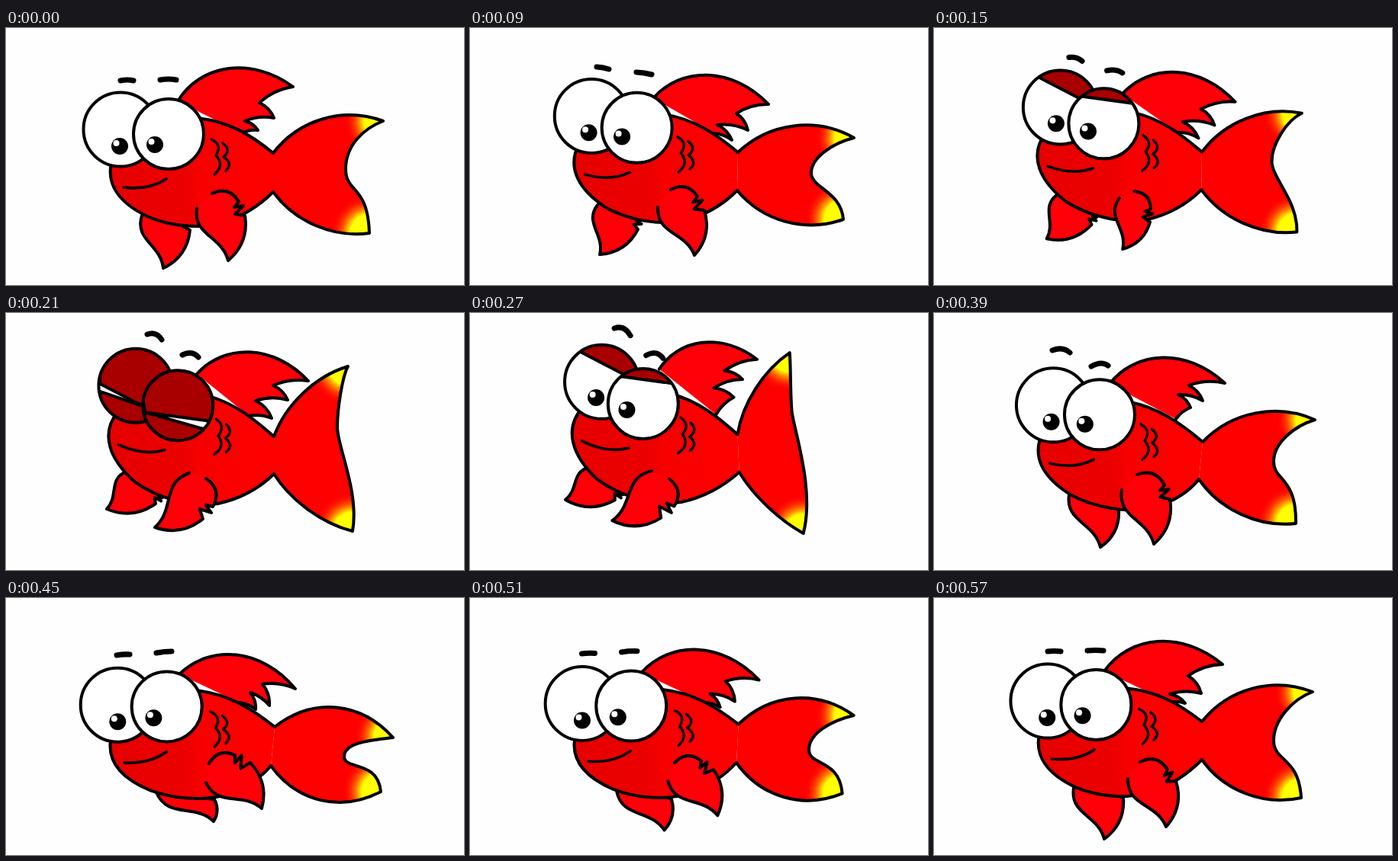
Animation, 600 px wide and 337 px high, one loop 600 ms. Source, as an HTML page:

```html
<!DOCTYPE html>
<html lang="en">
<head>
<meta charset="utf-8">
<title>Swimming fish</title>
<style>
  html, body { margin: 0; width: 100%; height: 100%; overflow: hidden; background: #fefefe; }
  svg { display: block; width: 100vw; height: 100vh; }
</style>
</head>
<body>
<svg id="stage" viewBox="0 0 600 337">
  <defs>
    <linearGradient id="skin" gradientUnits="userSpaceOnUse" x1="135" y1="0" x2="350" y2="0">
      <stop offset="0" stop-color="#e60000"/><stop offset=".48" stop-color="#ec0000"/>
      <stop offset=".56" stop-color="#f80000"/><stop offset="1" stop-color="#f00"/>
    </linearGradient>
  </defs>
</svg>
<script>
const LOOP = 600, STEP = 30;
const TIMES = [0, 90, 210, 330, 390, 450, 570];
const COUNT = TIMES.length;
const FIN_RED = '#ff0009';

// One row per key time; each row lists point coordinates.
const BEND = [[0], [.39], [.84], [1], [.27], [-.16], [-.045]];

// arc start, first notch, last notch, tip, base end
const NEAR_FIN = [
  [270,217, 305,228, 313,246, 291,305, 250,236],
  [263,212, 298,221, 307,239, 294,298, 246,235],
  [262,217, 271,254, 258,270, 195,281, 240,210],
  [261,218, 266,252, 247,265, 183,267, 237,206],
  [266,212, 302,226, 309,244, 288,303, 246,232],
  [266,217, 300,206, 320,216, 335,276, 262,242],
  [270,215, 306,225, 317,240, 304,300, 254,237]
];
const FAR_FIN = [
  [215,240, 240,248, 241,265, 206,315, 178,246],
  [200,225, 224,252, 220,264, 170,297, 167,232],
  [200,225, 205,242, 196,250, 132,257, 157,208],
  [190,220, 198,236, 187,243, 122,239, 155,200],
  [215,235, 240,243, 242,258, 218,307, 177,238],
  [240,245, 268,254, 273,264, 272,293, 197,255],
  [220,240, 245,248, 248,262, 223,316, 183,249]
];

// base, then alternating tips and notches
const DORSAL = [
  [225,96, 376,77, 332,98, 351,118, 313,122, 330,134, 309,138],
  [240,92, 391,100, 349,112, 364,134, 324,127, 343,147, 320,138],
  [250,80, 396,89, 350,95, 369,114, 327,115, 348,138, 318,135],
  [243,70, 356,37, 317,62, 345,67, 312,86, 341,87, 327,132],
  [230,93, 381,92, 334,95, 352,115, 320,107, 336,124, 317,139],
  [227,100, 379,119, 336,113, 345,141, 320,124, 327,146, 305,137],
  [223,96, 378,87, 333,102, 350,125, 309,126, 329,138, 309,137]
];

// upper joint, upper tip, notch, notch tangent, lower handle, lower tip, lower joint, bulges
const TAIL = [
  [350,164, 494,122, 445,185, 0,32, 474,205, 476,269, 350,215, .22,.18],
  [351,163, 503,144, 447,190, 0,20, 486,214, 489,251, 350,213, .22,.21],
  [351,162, 448,70, 434,150, 0,25, 463,235, 454,286, 351,211, .15,.12],
  [350,157, 402,44, 413,115, 4,22, 446,222, 427,290, 354,207, .12,.06],
  [352,169, 499,140, 445,195, 0,25, 475,215, 474,276, 347,218, .21,.18],
  [352,169, 507,183, 443,208, 0,18, 487,212, 491,254, 347,220, .28,.26],
  [351,162, 496,123, 445,187, 0,28, 478,208, 481,262, 351,212, .22,.2]
];

// both brows: ends, then arch height
const BROWS = [
  [150,69, 167,69, 202,68, 223,68, 2],
  [166,51, 182,54, 218,58, 238,61, 1],
  [185,28, 204,35, 231,55, 252,58, 8],
  [191,16, 213,27, 230,57, 253,62, 10],
  [155,49, 178,52, 206,70, 228,69, 7],
  [145,75, 162,74, 197,72, 217,70, 1],
  [149,70, 166,70, 201,69, 222,69, 1]
];

// Smooth looping interpolation that never overshoots its keys.
function pose(rows, t) {
  let i = COUNT - 1;
  while (TIMES[i] > t) i--;
  const time = k => TIMES[(k + COUNT) % COUNT] + LOOP * Math.floor(k / COUNT);
  const span = time(i + 1) - time(i), u = (t - time(i)) / span;
  return rows[0].map((_, c) => {
    const at = k => rows[(k + COUNT) % COUNT][c];
    const slope = k => (at(k + 1) - at(k)) / (time(k + 1) - time(k));
    const tangent = k => {
      const a = slope(k - 1), b = slope(k);
      return a * b > 0 ? 2 * a * b / (a + b) : 0;
    };
    const a = at(i), b = at(i + 1);
    return a + (b - a) * u * u * (3 - 2 * u)
      + span * u * (1 - u) * ((1 - u) * tangent(i) - u * tangent(i + 1));
  });
}

const pairs = list => Array.from({ length: list.length >> 1 }, (_, i) => [list[2 * i], list[2 * i + 1]]);
const str = p => p.map(v => v.toFixed(2)).join(' ');
const move = p => 'M' + str(p);
const line = p => 'L' + str(p);
const quad = (c, p) => 'Q' + str(c) + ' ' + str(p);
const cubic = (a, b, p) => 'C' + [a, b, p].map(str).join(' ');

// Point at u along a-b and v to its side, both in chord lengths.
function beside([ax, ay], [bx, by], u, v) {
  const dx = bx - ax, dy = by - ay;
  return [ax + u * dx + v * dy, ay + u * dy - v * dx];
}
const bow = (a, b, k) => quad(beside(a, b, .5, k), b);
const sweep = (a, b, u1, v1, u2, v2) => cubic(beside(a, b, u1, v1), beside(a, b, u2, v2), b);

const stage = document.getElementById('stage');
function add(tag, attrs, parent = stage) {
  const node = document.createElementNS('http://www.w3.org/2000/svg', tag);
  set(node, attrs);
  return parent.appendChild(node);
}
function set(node, attrs) {
  for (const k in attrs) node.setAttribute(k, attrs[k]);
}
const outlined = (fill, width = 4, parent = stage) => add('path', {
  fill, stroke: '#000', 'stroke-width': width, 'stroke-linejoin': 'round', 'stroke-linecap': 'round'
}, parent);

function tipGlow(id, r) {
  const glow = add('radialGradient', { id, gradientUnits: 'userSpaceOnUse', r }, stage.querySelector('defs'));
  add('stop', { offset: .5, 'stop-color': '#ff0' }, glow);
  add('stop', { offset: 1, 'stop-color': '#f00', 'stop-opacity': 0 }, glow);
  return glow;
}

function makeEye(id, rest, r, pupil, upperLid, lowerLid) {
  const clip = add('clipPath', { id }, stage.querySelector('defs'));
  add('circle', { r }, clip);
  const group = add('g', {});
  add('circle', { r, fill: '#fff' }, group);
  const ball = add('g', {}, group);
  add('circle', { r: 11, fill: '#000' }, ball);
  add('circle', { cx: -4.5, cy: -4, r: 4, fill: '#fff' }, ball);
  const lids = add('g', { 'clip-path': `url(#${id})` }, group);
  const lower = outlined('#a80000', 4, lids), upper = outlined('#a80000', 4, lids);
  add('circle', { r, fill: 'none', stroke: '#000', 'stroke-width': 4 }, group);

  const lidPath = (edge, shift, far) =>
    move([edge[0], edge[1] + shift]) + line([edge[2], edge[3] + shift]) + line([70, far]) + line([-70, far]) + 'Z';

  return (bend, amount, closed) => {
    const turn = amount * 18 * Math.PI / 180, cos = Math.cos(turn), sin = Math.sin(turn);
    set(group, { transform: `translate(${str(bend(rest))})` });
    set(ball, { transform: `translate(${str([pupil[0] * cos - pupil[1] * sin, pupil[0] * sin + pupil[1] * cos])})` });
    set(lids, { display: closed > 0 ? 'inline' : 'none' });
    set(upper, { d: lidPath(upperLid, -70 * (1 - closed), -150) });
    set(lower, { d: lidPath(lowerLid, 60 * (1 - closed), 150) });
  };
}

const farFin = outlined(FIN_RED);
const dorsal = outlined(FIN_RED);
const tailFill = add('path', { fill: '#f00' });
const glows = [tipGlow('glowTop', 50), tipGlow('glowLow', 50)];
const glowFills = glows.map(g => add('path', { fill: `url(#${g.id})` }));
const tail = outlined('none');
const body = outlined('url(#skin)');
const nearFin = outlined(FIN_RED);
const mouth = outlined('none', 3.6);
const scales = outlined('none', 3.4);
const eyes = [
  makeEye('leftEye', [150, 133], 48.5, [-1, 22], [-46, -2, 50, 48], [-46, 8, 50, 41]),
  makeEye('rightEye', [213, 139], 46, [-18, 14], [-43, 9, 45, 21], [-43, 9, 45, 34])
];
const brows = outlined('none', 7);

function finPath(list) {
  const [start, p, q, tip, end] = pairs(list);
  return move(start) + bow(start, p, .45)
    + [[.2, -.42], [.36, .17], [.64, -.56]].map(([u, v]) => line(beside(p, q, u, v))).join('')
    + line(q) + bow(q, tip, .28) + sweep(tip, end, .4, -.12, .65, .29);
}

function dorsalPath(list) {
  const pts = pairs(list);
  let d = move(pts[0]) + sweep(pts[0], pts[1], .23, .29, .67, .31);
  for (let i = 2; i < pts.length; i++) d += bow(pts[i - 1], pts[i], i % 2 ? .2 : -.15);
  return d;
}

function tailPath([j1, t1, n, tan, handle, t2, j2, [top, low]]) {
  return move(j1) + sweep(j1, t1, .3, top, .7, top)
    + cubic([t1[0] + .5 * (n[0] - t1[0]), t1[1] + .15 * (n[1] - t1[1])], [n[0] - tan[0], n[1] - tan[1]], n)
    + cubic([n[0] + tan[0], n[1] + tan[1]], handle, t2)
    + sweep(t2, j2, .3, low, .7, low);
}

function draw(t) {
  const [amount] = pose(BEND, t);
  const tailPts = pairs(pose(TAIL, t));
  const [j1, t1, , , , t2, j2] = tailPts;
  const lift = j1[1] - 164;

  // The body curls up toward the head, more the farther from the tail joint.
  const bend = ([x, y]) => {
    const d = Math.max(0, 350 - x), k = 45 * amount / 40000;
    return [x - 1.85 * k * d * (y - 190), y - k * d * d + lift * Math.max(0, 1 - d / 130)];
  };
  const bq = (a, b) => quad(bend(a), bend(b));
  const bc = (a, b, c) => cubic(bend(a), bend(b), bend(c));

  set(farFin, { d: finPath(pose(FAR_FIN, t)) });
  set(nearFin, { d: finPath(pose(NEAR_FIN, t)) });
  set(dorsal, { d: dorsalPath(pose(DORSAL, t)) });

  const d = tailPath(tailPts);
  [tailFill, tail, ...glowFills].forEach(n => set(n, { d }));
  [t1, t2].forEach(([cx, cy], i) => set(glows[i], { cx, cy }));

  set(body, { d: move(j1) + cubic(bend([322, 141]), bend([292, 122]), bend([250, 118]))
    + line(bend([200, 110])) + line(bend([140, 170]))
    + bc([128, 205], [150, 230], [185, 247]) + bc([215, 260], [255, 264], [285, 255])
    + cubic(bend([312, 246]), bend([333, 232]), j2) });
  set(mouth, { d: move(bend([154, 209])) + bq([187, 213], [210, 198]) });
  set(scales, { d: move(bend([269, 146])) + bq([284, 153], [275, 167]) + bq([287, 180], [273, 192])
    + move(bend([284, 151])) + bq([296, 160], [285, 169]) + bq([298, 178], [288, 187]) });

  const closed = Math.max(0, 1 - Math.abs(t - 210) / 90);
  eyes.forEach(eye => eye(bend, amount, closed));

  const brow = pose(BROWS, t), [a, b, c, e] = pairs(brow), arch = brow[8];
  const arc = (p, q) => move(p) + quad([(p[0] + q[0]) / 2 + arch * .3, (p[1] + q[1]) / 2 - arch], q);
  set(brows, { d: arc(a, b) + arc(c, e) });
}

function tick() {
  draw(Math.floor(performance.now() % LOOP / STEP) * STEP);
  requestAnimationFrame(tick);
}
tick();
</script>
</body>
</html>
```
